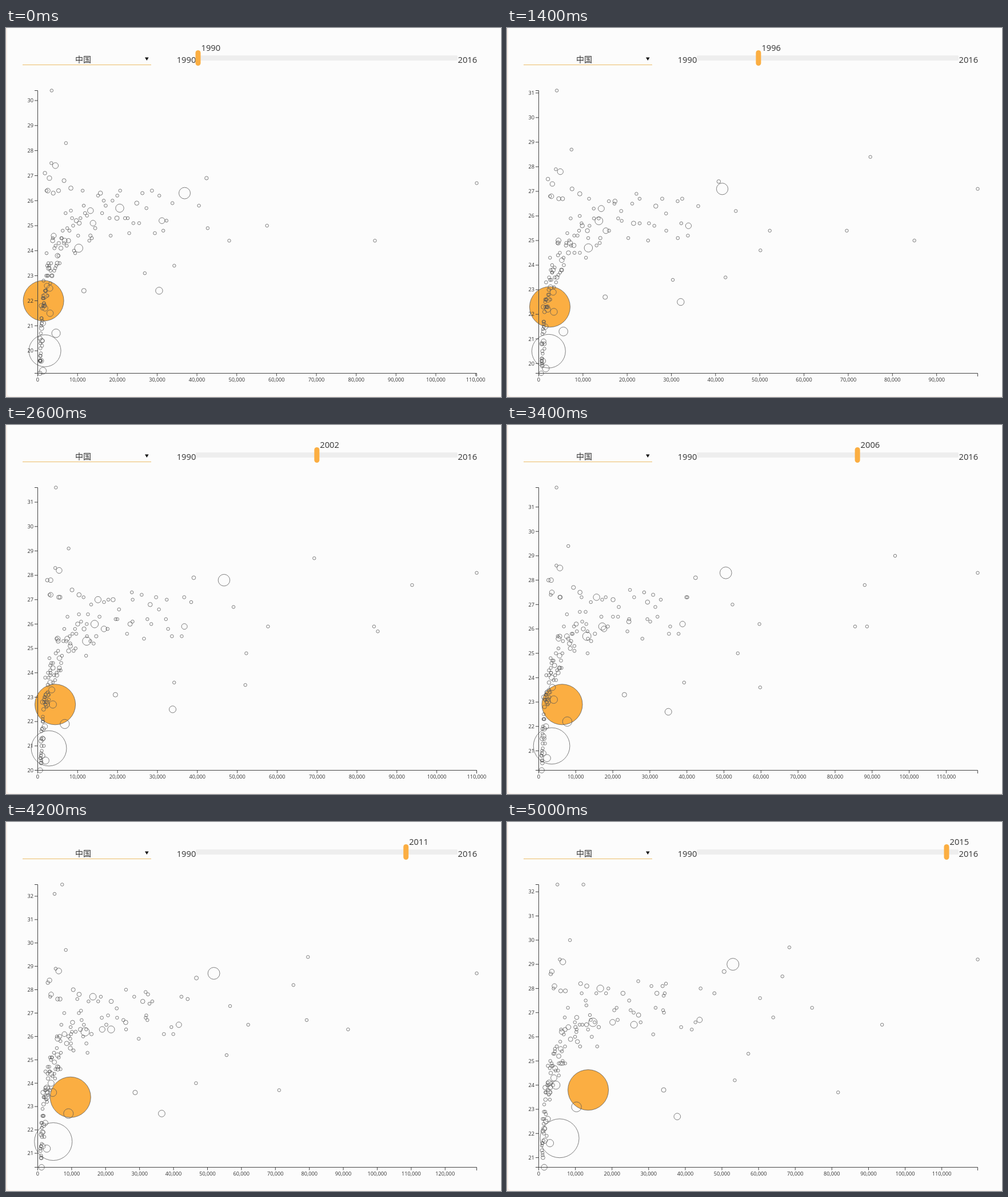
An HTML page that plays this animation: 866 by 646 pixels, repeating every 5200 ms.

```html
<!DOCTYPE html>
<html lang="zh">
<head>
<meta charset="utf-8">
<style>
  html, body { margin: 0; width: 100%; height: 100%; overflow: hidden; background: #f8eee8; }
  svg { display: block; width: 866px; height: 646px; }
  text { font-family: "Open Sans", "Noto Sans", sans-serif; fill: #333; }
  .ui { font-size: 14.7px; }
  .pick { font: 14px "Noto Sans CJK SC", "Noto Sans CJK", sans-serif; text-anchor: middle; }
  .axis path { fill: none; stroke: #444; stroke-width: 1; }
  .axis text { font-size: 9.2px; text-anchor: middle; }
  .axis .left { text-anchor: end; }
  circle { fill: none; stroke: #555; stroke-opacity: .75; }
</style>
</head>
<body>
<svg viewBox="0 0 866 646">
  <rect x="2" y="-6" width="880" height="651" rx="5" fill="#fcfcfc"/>
  <text class="pick" x="135" y="60">中国</text>
  <path d="M243 51.5h6.6l-3.3 5.5z" fill="#111"/>
  <path d="M29 64.5H254" stroke="#ecbc68"/>
  <rect x="332" y="48" width="458" height="9" rx="2" fill="#eee"/>
  <text class="ui" x="298.7" y="61">1990</text>
  <text class="ui" x="790.5" y="61">2016</text>
  <rect id="handle" y="39" width="9" height="27" rx="4.5" fill="#fbae42"/>
  <text id="year" class="ui" y="40"></text>
  <g id="bubbles"></g>
  <g id="axis" class="axis"></g>
</svg>
<script>
const LOOP = 5200, LEFT = 55.5, RIGHT = 823.5, TOP = 109.5, BOTTOM = 604.5, SMALL = 2.7;
const $ = id => document.getElementById(id);
const mix = (a, b, k) => a + (b - a) * k;
const grow = (a, b, k) => a * (b / a) ** k;
const age = year => (year - 1990) / 25;
const bubbles = [];

function addBubble(place, r0, r1 = r0, fill = 'none') {
  const node = document.createElementNS('http://www.w3.org/2000/svg', 'circle');
  node.style.fill = fill;
  $('bubbles').append(node);
  bubbles.push({ node, place, radius: year => mix(r0, r1, age(year)) });
}

// Key points are [year, income in thousands, body mass index].
function track([r0, r1, fill], ...points) {
  addBubble(year => {
    if (year < points[0][0]) return null;
    const next = Math.max(1, points.findIndex(p => p[0] >= year));
    const [y0, income0, mass0] = points[next - 1];
    const [y1, income1, mass1] = points[next];
    const k = (year - y0) / (y1 - y0);
    return [grow(income0, income1, k), mix(mass0, mass1, k)];
  }, r0, r1, fill);
}

// Large populations
track([35.5, 35.5, '#fbae42'], [1990, 1.45, 22], [2006, 6.33, 22.9], [2015, 13.5, 23.8]);
track([28, 34], [1990, 1.8, 20], [2002, 2.8, 20.9], [2015, 5.7, 21.8]);
track([10, 10.5], [1990, 36.9, 26.3], [2006, 50.5, 28.3], [2015, 53, 29]);
track([7.5, 8.7], [1990, 4.6, 20.7], [2015, 10.3, 23.1]);
track([7.2, 7.5], [1990, 10.3, 24.1], [2015, 14.8, 26.6]);
track([7.2, 6], [1990, 20.6, 25.7], [1998, 11.85, 25.8], [2015, 26, 26.5]);
track([6.2, 5.8], [1990, 30.5, 22.4], [2015, 37.8, 22.7]);
track([5.2, 6], [1990, 13.25, 25.6], [2002, 15.1, 27], [2015, 16.8, 28]);
track([5.2, 4.8], [1990, 31.2, 25.2], [2015, 43.9, 26.7]);
track([4, 4], [1990, 11.6, 22.4], [2015, 34.1, 23.8]);
track([5.8, 7.2], [1990, 3.1, 21.5], [2015, 4.7, 24]);
track([6, 6.5], [1990, 1.3, 19.2], [2015, 3.05, 21.6]);

// Bubbles that set the ends of the axes
const DOT = [SMALL, SMALL];
track(DOT, [1990, 110.27, 26.7], [1993, 98.2, 26.9], [1998, 100.02, 27.3], [2006, 88, 27.8], [2015, 66.5, 28.5]);
track(DOT, [2000, 106, 28], [2006, 118.5, 28.3], [2011, 129.3, 28.7], [2015, 119.8, 29.2]);
track(DOT, [1990, 3.5, 30.4], [1998, 4.3, 31.34], [2006, 4.8, 31.8], [2015, 5.1, 32.3]);
track(DOT, [2009, 6, 32.3], [2011, 7.2, 32.5], [2015, 12.2, 32.3]);
track([3.8, 5.2], [1990, .55, 19.14], [2002, .6, 20], [2015, 1.5, 20.6]);

// Rich outliers
track(DOT, [1995, 76, 28.3], [2002, 69.3, 28.7], [2006, 96.2, 29], [2015, 68.4, 29.7]);
track(DOT, [1990, 84.7, 24.4], [2006, 85.4, 26.1], [2015, 74.6, 27.2]);
track(DOT, [1990, 57.6, 25], [2003, 87, 25.95], [2015, 93.7, 26.5]);
track(DOT, [1990, 34.3, 23.4], [2015, 81.7, 23.7]);
track(DOT, [1990, 42.7, 24.9], [1998, 55.9, 25.6], [2015, 64, 26.8]);
track(DOT, [1990, 48.1, 24.4], [2015, 57.2, 25.3]);
track(DOT, [1990, 26.9, 23.1], [2002, 34.2, 23.6], [2015, 53.5, 24.2]);
track(DOT, [1990, 40.5, 25.8], [2015, 60.4, 27.6]);
track([3.1, 3.5], [1990, 42.4, 26.9], [2002, 39.1, 27.9], [2015, 50.6, 28.7]);

// All other bubbles: seeded incomes, evenly spread on a log scale,
// with a body mass that follows a curve and rises over the years.
let seed = 19;
const random = () => {
  seed = (seed * 16807) % 2147483647;
  return seed / 2147483647;
};

function crowd(count, poorest, richest, massAt) {
  for (let i = 0; i < count; i++) {
    const income = grow(poorest, richest, (i + random()) / count);
    const wealth = Math.log10(income);
    const mass = Math.max(19.6, massAt(wealth));
    const growth = mix(1.3, 2.1, random()) - .25 * wealth;
    const rise = mix(1.4, 2.1, random());
    const r = SMALL + 2.8 * random() ** 7;
    addBubble(year => [income * growth ** age(year), mass + rise * age(year)], r);
  }
}

crowd(124, .55, 34, w => 20.9 + 6 * w - 1.9 * w * w + 1.3 * (random() + random() - 1));
crowd(11, 1.8, 9, () => mix(26.2, 28.6, random()));

function yearAt(time) {
  const step = time < 400 ? 0 : Math.floor((time - 400) / 200) + 1;
  return 1990 + step + (step > 18 ? 1 : 0);
}

function drawAxes(x, y, maxX, minY, maxY) {
  let lines = `M50 ${TOP}H${LEFT}V${BOTTOM}H50M${LEFT} 610V${BOTTOM}H${RIGHT}V610`;
  let labels = '';
  for (let v = 0; v <= maxX; v += 10) {
    lines += `M${x(v)} ${BOTTOM}v5`;
    labels += `<text x="${x(v)}" y="618.5">${(v * 1000).toLocaleString('en-US')}</text>`;
  }
  for (let v = Math.ceil(minY); v <= maxY; v++) {
    lines += `M50 ${y(v)}H${LEFT}`;
    labels += `<text class="left" x="48" y="${y(v) + 3.3}">${v}</text>`;
  }
  $('axis').innerHTML = `<path d="${lines}"/>${labels}`;
}

function draw(year) {
  const places = bubbles.map(b => {
    const p = b.place(year);
    return p && [p[0], Math.round(p[1] * 10) / 10];
  });
  const shown = places.filter(Boolean);
  const maxX = Math.max(...shown.map(p => p[0]));
  const masses = shown.map(p => p[1]);
  const minY = Math.min(...masses), maxY = Math.max(...masses);
  const x = v => mix(LEFT, RIGHT, v / maxX);
  const y = v => mix(BOTTOM, TOP, (v - minY) / (maxY - minY));

  bubbles.forEach(({ node, radius }, i) => {
    const p = places[i];
    node.style.display = p ? '' : 'none';
    if (!p) return;
    node.setAttribute('cx', x(p[0]));
    node.setAttribute('cy', y(p[1]));
    node.setAttribute('r', radius(year));
  });
  drawAxes(x, y, maxX, minY, maxY);

  const slide = 336 + (year - 1990) * 17.32;
  $('handle').setAttribute('x', slide - 4.5);
  $('year').setAttribute('x', slide + 5.5);
  $('year').textContent = year;
}

let current, start;
function tick(now) {
  start ??= now;
  const year = yearAt((now - start) % LOOP);
  if (year !== current) draw(current = year);
  requestAnimationFrame(tick);
}
draw(current = 1990);
requestAnimationFrame(tick);
</script>
</body>
</html>
```
